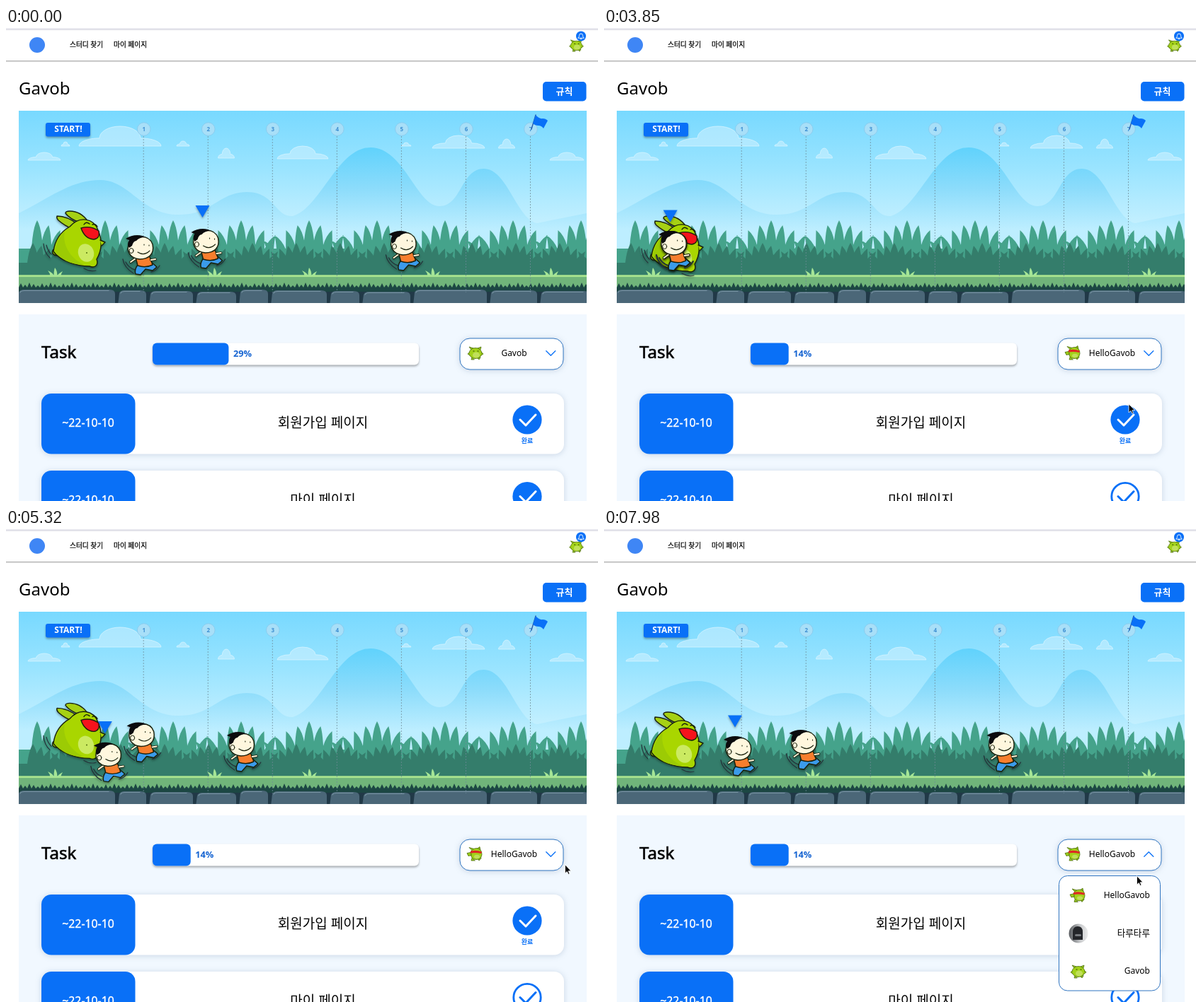
Animation of 836x669 px, one loop 8 s. Source, as an HTML page:

```html
<!DOCTYPE html>
<html lang="ko">
<head>
<meta charset="utf-8">
<title>Gavob</title>
<style>
html, body { margin: 0; width: 100%; height: 100%; overflow: hidden; background: #fff; }
svg { display: block; width: 836px; height: 669px; }
text { font-family: 'Noto Sans', 'Noto Sans CJK KR', 'Noto Sans CJK', sans-serif; }
.soft { filter: drop-shadow(0 1px 4px rgba(60, 90, 130, .22)); }
.low { filter: drop-shadow(0 2px 1.5px rgba(0, 0, 0, .32)); }
</style>
</head>
<body>
<svg id="stage" viewBox="0 0 836 669" xmlns="http://www.w3.org/2000/svg"></svg>
<script>
const BLUE = '#0970f7', EDGE = '#2f74c0';
const NAME = 'Gavob', FAN = 'HelloGavob', PAL = '타루타루';
const $ = id => document.getElementById(id);

const rect = (x, y, w, h, fill, rx = 0, more = '') =>
  `<rect x="${x}" y="${y}" width="${w}" height="${h}" rx="${rx}" fill="${fill}" ${more}/>`;
const path = (d, fill = 'none', more = '') => `<path d="${d}" fill="${fill}" ${more}/>`;
const oval = (x, y, rx, ry, fill, more = '') =>
  `<ellipse cx="${x}" cy="${y}" rx="${rx}" ry="${ry}" fill="${fill}" ${more}/>`;
const text = (s, x, y, size, fill = '#000', weight = 400, anchor = 'start', more = '') =>
  `<text x="${x}" y="${y}" font-size="${size}" fill="${fill}" font-weight="${weight}" text-anchor="${anchor}" ${more}>${s}</text>`;
// A thin outline gives a medium weight where only regular and bold exist
const medium = (s, x, y, size, fill = '#000', anchor = 'start') =>
  text(s, x, y, size, fill, 400, anchor, `stroke="${fill}" stroke-width="${size * .025}"`);
const group = (body, more = '') => `<g ${more}>${body}</g>`;
const use = (id, x, y, scale = 1) =>
  `<use href="#${id}" transform="translate(${x} ${y}) scale(${scale})"/>`;
const line = (color, width) =>
  `stroke="${color}" stroke-width="${width}" stroke-linecap="round" stroke-linejoin="round"`;

// Character art, drawn around its own centre
const INK = line('#18200c', 1.4);
const monster =
  path('M-49 3Q-48 16-40 23M-45 5Q-43 13-38 18M8 38Q16 43 25 41', 'none', line('#24333a', 1.2)) +
  path('M14-28Q4-43-12-43Q-18-43-18-40Q-12-32 2-27Z', '#a6d114', INK) +
  path('M0-24Q-15-36-30-36Q-31-33-28-30Q-19-22-8-18Z', '#a6d114', INK) +
  path('M-30 10Q-38 10-36 17Q-32 22-25 18Z', '#9ccb0a', INK) +
  path('M-12-21C2-37 22-33 28-16C35 0 33 13 26 25C29 33 24 38 16 35C-3 35-26 27-35 14C-33-2-26-13-12-21Z', '#a9d600', INK) +
  path('M-33 13C-30 0-26-8-19-14C-23 4-12 23 8 33C-12 32-26 25-33 13Z', '#9ccb04') +
  oval(11, 16, 11, 13, '#cbea62', 'transform="rotate(-20 11 16)"') +
  path('M4-19Q17-23 29-15Q31-4 22-3Q9-4 4-19Z', '#f5131c', INK) +
  path('M8-24Q11-29 16-25M20-24Q24-26 27-21', 'none', INK) +
  path('M31-2L38 1L33 6', '#a9d600', INK) +
  oval(12, 16, 1, 1, '#52700d');

const runner =
  path('M-24 16Q-22 28-9 36M-20 20Q-16 28-7 31M16 34Q23 33 28 25', 'none', line('#24333a', 1.4)) +
  path('M-3 24Q-8 31-6 37L1 38L8 30L18 32L24 27L14 18Z', '#3b9bea', INK) +
  path('M-6 13Q4 7 14 13L18 24Q8 29-3 25Z', '#f77e2d', INK) +
  path('M-6 15L-13 20M16 17L22 16', 'none', line('#18200c', 3.6)) +
  path('M-6 15L-13 20M16 17L22 16', 'none', line('#fdf3d6', 2)) +
  path('M-15-8C-9-18 13-20 18-5C21 9 12 16 0 16C-14 15-20 4-15-8Z', '#fff7de', INK) +
  path('M-15 0Q-19-5-15-11L-20-13Q-9-20 4-17L8-15Q-1-15-5-10Q-9-10-11-3Z', '#0b0b0d') +
  oval(-12, 4, 3, 3.5, '#fff7de', line('#18200c', 1)) +
  path('M6-5V-4M13-4V-3M-3 6Q6 12 14 4', 'none', line('#18200c', 1.1));

const THIN = line('#4a6b10', .8);
const mini =
  path('M-6-5L-9-9L-3-7ZM3-7L8-9L7-5ZM-5 6L-6 9H-2ZM3 7L5 9L7 6Z', '#9ccc16', THIN) +
  oval(0, 0, 9, 7.5, '#a3d21a', THIN) +
  path('M-9-1L-11 1L-8 3M9-1L11 1L8 3', '#9ccc16', THIN) +
  oval(1, 2.5, 5, 4, '#c0e05a') + path('M-3-3H-2M3-3H4', 'none', line('#26350c', 1.1));

const scarf =
  path('M-5-5L-9-9L-2-7ZM2-7L6-10L7-5ZM-5 6L-6 9.5H-1ZM3 6L5 9.5L8 6Z', '#9ccc16', THIN) +
  path('M-7-2Q-5-8 2-8Q9-7 9 1Q8 8 1 8Q-7 8-7-2Z', '#a3d21a', THIN) +
  path('M-7-2L-12-1L-10 3L-6 2Z', '#9ccc16', THIN) +
  path('M-7-4Q1-6 9-3L8-.5Q1-2-7-1Z', '#df2924') + oval(2, 4, 4, 2.8, '#c0e05a');

const arrow = path('M0 0V12L2.8 9.5L4.7 13.4L6.5 12.6L4.7 8.8H8.3Z', '#000', line('#fff', .8));
const hand = path('M-1 0Q.5-1.5 2 0V5L3 4L5 5L7 5L8.5 6.5V10L7 14H1L-3.5 8Q-3 6-1 7Z', '#fff', line('#111', 1)) +
  path('M3 6V8M5 6V8', 'none', line('#111', .6));

// A round dome between two lower shoulders on a flat base
const cloud = (x, y, w, h) => {
  const q = w / 4, low = h * .4, top = h - low;
  return path(`M${x - 2 * q} ${y}A${q} ${low} 0 0 1 ${x - q} ${y - low}A${q} ${top} 0 0 1 ${x + q} ${y - low}` +
    `A${q} ${low} 0 0 1 ${x + 2 * q} ${y}Z`,
    '#d8f4ff', 'fill-opacity=".5" stroke="#d9f4ff" stroke-opacity=".75"');
};

const leaf = (x, tx, ty, base, w) =>
  `M${x - w} ${base}Q${x - w} ${ty + w * 1.6} ${tx} ${ty}Q${x + w} ${ty + w * 1.6} ${x + w} ${base}Z`;

// Clumps of leaves: tallest in the middle, fanning out at the sides
const bush = (top, depth, base, period, phase, fill) => {
  let d = `M18 ${top + depth + 12}H820V${base}H18Z`;
  for (let x = phase - period; x < 830; x += period / 8) {
    const k = (x - phase) / period, u = k - Math.round(k);
    d += leaf(x, x + u * 34, top + depth * Math.abs(u) * 2, base, 9);
  }
  return path(d, fill);
};

const teeth = () => {
  let d = 'M18 373V367';
  for (let x = 18; x < 820; x += 6) d += `L${x + 3} ${360 + (x * 7 % 5)}L${x + 6} ${367 + x % 3}`;
  return path(d + 'V373Z', '#1c4743');
};

const stones = () => {
  const cuts = [14, 156, 200, 266, 327, 372, 455, 501, 573, 681, 752, 826];
  return cuts.slice(1).map((end, i) => {
    const a = cuts[i] + 2, b = end - 2, y = 370 + i * 5 % 4;
    return path(`M${a} 392L${a + 2} ${y + 4}Q${a + 4} ${y} ${a + 9} ${y}H${b - 8}Q${b} ${y} ${b} ${y + 6}V392Z`, '#4b6778') +
      path(`M${a + 4} ${y + 4}Q${a + 5} ${y + 1.5} ${a + 10} ${y + 1.5}H${b - 9}`, 'none', line('#7794a2', 1.2));
  }).join('');
};

const tuft = x => path(leaf(x - 5, x - 11, 343, 351, 2.5) + leaf(x, x - 1, 339, 351, 2.5) + leaf(x + 5, x + 10, 344, 351, 2.5), '#a5e596');

const days = () => [...Array(7)].map((_, i) => {
  const x = 194.2 + i * 91.05;
  return path(`M${x} 153V374`, 'none', 'stroke="#6f8b98" stroke-opacity=".75" stroke-dasharray="2 2"') +
    oval(x + .5, 143, 9.3, 9.3, '#a8dff8', 'stroke="#87c8eb" stroke-width=".8"') +
    text(i + 1, x + .5, 145.5, 8, '#3d8fd2', 600, 'middle');
}).join('');

const scene = group(
  rect(18, 117, 802, 272, 'url(#sky)') +
  path('M18 262C62 240 92 215 133 215S190 262 240 264S300 232 340 232S380 268 405 266C445 254 468 169 515 169S580 252 612 252S642 199 675 199S722 272 750 276L820 262V345H18Z', 'url(#hill)') +
  [[161, 167, 116, 28], [54, 187, 46, 11], [84, 167, 12, 6], [250, 167, 18, 7], [311, 184, 23, 14],
   [419, 185, 72, 18], [565, 167, 14, 5], [639, 170, 74, 18], [707, 170, 23, 13], [792, 187, 48, 11]]
    .map(c => cloud(...c)).join('') +
  bush(272, 28, 348, 96, 140, '#45a38b') +
  bush(304, 16, 354, 62, 100, '#347d6b') +
  rect(18, 349, 802, 20, '#70b47a') + rect(18, 349.5, 802, 2.6, '#a9e48f') +
  [70, 295, 429, 603, 770].map(tuft).join('') +
  rect(18, 369, 802, 20, '#213947') + teeth() + stones() + days() +
  path('M742 143L748 123', 'none', line('#2a5ca8', 1.4)) +
  path('M748 123Q753 129 758 128Q762 128 765 131L759 142Q756 138 752 138Q747 138 744 135Z', BLUE) +
  rect(56, 134, 63, 19.5, BLUE, 3, 'class="low"') +
  text('START!', 88, 146.5, 12, '#fff', 700, 'middle') +
  group(use('monster', 102, 302), 'id="beast" class="low"') +
  [2, 1, 0].map(i => `<use href="#runner" id="boy${i}" class="low"/>`).join('') +
  path('M-10-8H10L0 9Z', BLUE, 'id="mark" class="low"'),
  'clip-path="url(#sceneBox)"');

const tick = (y, color) => path(`M726 ${y}L734 ${y + 8}L748 ${y - 7}`, 'none', line(color, 3));
const done = y => oval(736, y, 20.6, 20.6, BLUE) + tick(y, '#fff');
const todo = y => oval(736, y, 19.2, 19.2, '#fff', `stroke="${BLUE}" stroke-width="2.8"`) + tick(y, BLUE);
const card = (y, title) =>
  rect(50, y, 738, 85.5, '#fff', 14, 'class="soft"') + rect(50, y, 132.5, 85.5, BLUE, 14) +
  medium('~22-10-10', 116, y + 47, 15.8, '#fff', 'middle') + text(title, 447.5, y + 48, 19, '#000', 400, 'middle');

const header =
  rect(0, 0, 836, 2, '#e9e9f0') + rect(0, 2, 836, 1, '#d9d9e2') +
  rect(0, 46, 836, 1, '#b4b4b4') + rect(0, 47, 836, 1, '#dcdcdc') +
  oval(44, 24, 11, 11, '#3f86f5') +
  medium('스터디 찾기', 90, 27, 9.7) + medium('마이 페이지', 152, 27, 9.7) +
  use('mini', 805.5, 25, .9) +
  oval(812, 11.5, 7, 7, BLUE) +
  path('M808 14Q809.5 13 809.5 10.5A2.5 2.5 0 0 1 814.5 10.5Q814.5 13 816 14ZM811 15.5H813', 'none', line('#fff', .9)) +
  text(NAME, 18, 94, 24) +
  rect(758, 76, 61.5, 27.5, BLUE, 5) + text('규칙', 788.5, 94, 13, '#fff', 700, 'middle');

const photo = oval(670, 572, 13.5, 13.5, 'url(#photo)') +
  path('M662 581V570Q662 562 669 562T676 570V581Z', '#24262a') + rect(665, 573, 9, 3, '#777a7e', 1.5);

const tasks =
  rect(18, 405, 802, 264, '#f1f8ff') + medium('Task', 50, 467, 24) +
  rect(207, 445.5, 376, 31, '#fff', 6, 'class="low"') + rect(207, 445.5, 107, 31, BLUE, 6, 'id="bar"') +
  text('', 321, 465, 12.8, '#1765d2', 600, 'start', 'id="percent"') +
  card(517, '회원가입 페이지') + done(554) + text('완료', 736, 586.5, 9, BLUE, 600, 'middle') +
  card(626, '마이 페이지') + group(done(662.5), 'id="second"') + group(todo(662.5), 'id="secondOpen"') +
  rect(641, 439, 146, 44, '#fff', 14, `stroke="${EDGE}" class="soft"`) +
  group(use('mini', 663, 460), 'id="faceA"') + group(use('scarf', 663, 459.5), 'id="faceB"') +
  text('', 717.5, 464, 12, '#000', 400, 'middle', 'id="chosen"') +
  path('M-6.5-3.2L0 3.2L6.5-3.2', 'none', `${line(BLUE, 1.3)} id="chevron"`) +
  group(
    rect(642.5, 490.5, 143, 162.5, '#fff', 12, `stroke="${EDGE}"`) +
    use('scarf', 670, 518) + photo + use('mini', 670, 626) +
    [FAN, PAL, NAME].map((s, i) => text(s, 771, 522 + i * 53.5, i === 1 ? 12.6 : 12, '#000', 400, 'end', `id="item${i}"`)).join(''),
    'id="menu"');

$('stage').innerHTML = `<defs>
<linearGradient id="sky" x1="0" y1="0" x2="0" y2="1"><stop stop-color="#78d9ff"/><stop offset=".3" stop-color="#9ae4ff"/><stop offset=".62" stop-color="#c8f1ff"/></linearGradient>
<linearGradient id="hill" gradientUnits="userSpaceOnUse" x1="0" y1="169" x2="0" y2="285"><stop stop-color="#60d2fc"/><stop offset=".5" stop-color="#8cdcfb"/><stop offset="1" stop-color="#bdeeff"/></linearGradient>
<linearGradient id="photo" x1="0" x2="1"><stop stop-color="#55585c"/><stop offset=".6" stop-color="#c9cbcd"/><stop offset="1" stop-color="#ececec"/></linearGradient>
<clipPath id="sceneBox">${rect(18, 117, 802, 272, '#000')}</clipPath>
<g id="monster">${monster}</g><g id="runner">${runner}</g><g id="mini">${mini}</g><g id="scarf">${scarf}</g></defs>` +
  rect(0, 0, 836, 669, '#fff') + header + scene + tasks +
  group(arrow, 'id="arrow"') + group(hand, 'id="hand"');

const LOOP = 8000, SWITCH = 3220, RUN = 3760, RUN_TIME = 3100;
const clamp = v => Math.min(1, Math.max(0, v));
const mix = (a, b, k) => a + (b - a) * k;
const move = (id, x, y, more = '') => $(id).setAttribute('transform', `translate(${x.toFixed(2)} ${y.toFixed(2)}) ${more}`);
const show = (id, on) => $(id).setAttribute('visibility', on ? 'visible' : 'hidden');

// cubic-bezier(.42, 0, .58, 1)
function easeInOut(x) {
  let lo = 0, hi = 1;
  for (let i = 0; i < 24; i++) {
    const s = (lo + hi) / 2, r = 1 - s;
    if (1.26 * r * r * s + 1.74 * r * s * s + s ** 3 < x) lo = s; else hi = s;
  }
  return 3 * lo * lo - 2 * lo ** 3;
}

const lobe = (t, a, b) => Math.sin(Math.PI * clamp((t - a) / (b - a))) ** 2;
const hop = t => lobe(t, 3850, 4830) + lobe(t, 4830, 6790);

const boys = [
  { x: 189, y: 311, sway: 23 },
  { x: 281.5, y: 302, sway: -24 },
  { x: 560.5, y: 305, sway: 0 }
];

// Pointer: time, x, y
const trail = [
  [0, 708, 690], [770, 744, 462], [910, 745, 463], [1050, 747, 463], [1260, 753, 464], [1820, 753, 464],
  [2250, 742, 520], [2590, 734, 566], [2730, 728, 574], [2870, 728, 574], [3080, 738, 520], [3570, 740, 524],
  [3850, 741, 532], [4480, 787, 493], [4830, 802, 481], [5810, 777, 469], [6720, 766, 463],
  [7140, 767, 462], [7350, 764, 461], [7700, 764, 461], [7980, 752.5, 491], [8000, 752.5, 491]
];
function pointer(t) {
  const i = Math.max(1, trail.findIndex(p => p[0] > t));
  const [a, b] = [trail[i - 1], trail[i]], k = (t - a[0]) / (b[0] - a[0]);
  return [mix(a[1], b[1], k), mix(a[2], b[2], k)];
}

function draw(t) {
  const switched = t >= SWITCH;
  const p = switched ? easeInOut(clamp((t - RUN) / RUN_TIME)) : 1;
  const h = switched ? hop(t) : 0;

  move('beast', 0, mix(7, 0, p) - 32 * h);
  const spots = boys.map(b => [mix(97.5, b.x, p), mix(305, b.y, p) + b.sway * h]);
  spots.forEach(([x, y], i) => move('boy' + i, x, y));
  const [mx, my] = spots[switched ? 0 : 1];
  move('mark', mx - 4, my - (switched ? 39.5 : 43));

  const share = mix(2, 1, easeInOut(clamp((t - SWITCH) / 350))) / 7;
  $('bar').setAttribute('width', 376 * share);
  $('percent').setAttribute('x', 207 + 376 * share + 6.5);
  $('percent').textContent = switched ? '14%' : '29%';
  show('second', !switched);
  show('secondOpen', switched);
  show('faceA', !switched);
  show('faceB', switched);
  $('chosen').textContent = switched ? FAN : NAME;

  const open = (t >= 1400 && t < SWITCH) || t >= 7560;
  const [x, y] = pointer(t);
  const inside = open && x > 642 && x < 786 && y > 495 && y < 653;
  const hover = inside ? Math.floor((y - 491) / 54) : -1;
  show('menu', open);
  move('chevron', 769.3, 460, open ? 'scale(1 -1)' : '');
  for (let i = 0; i < 3; i++) $('item' + i).setAttribute('fill', i === hover ? '#1a75dc' : '#000');
  show('arrow', !inside);
  show('hand', inside);
  move('arrow', x, y);
  move('hand', x, y);
}

function frame() {
  draw(performance.now() % LOOP);
  requestAnimationFrame(frame);
}
frame();
</script>
</body>
</html>
```
